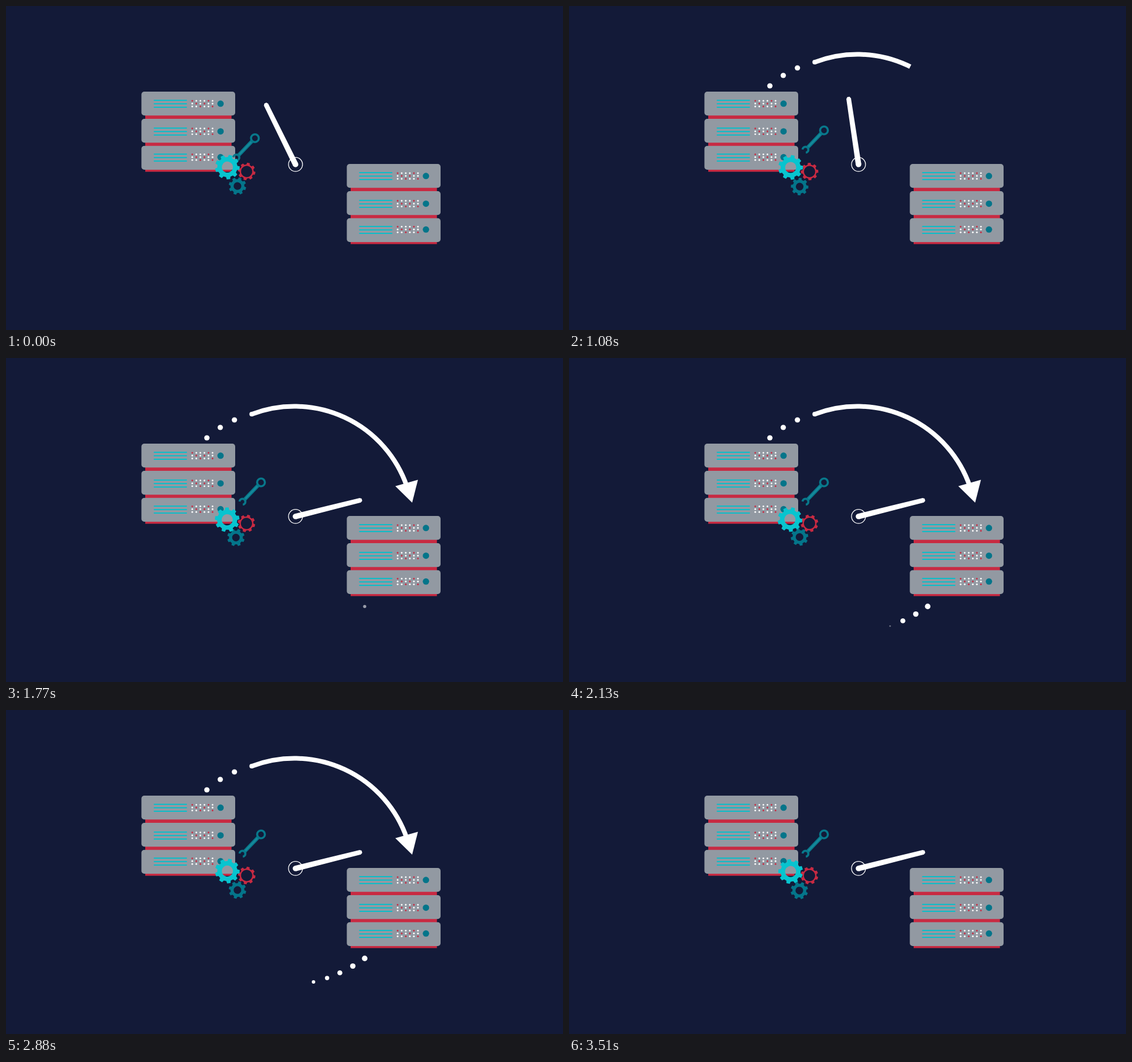
Animation of 960x560 px, one loop 3.54 s. Source, as an HTML page:

```html
<!DOCTYPE html>
<html lang="en">
<head>
<meta charset="utf-8">
<title>Server migration</title>
<style>
  html, body { margin: 0; width: 100%; height: 100%; overflow: hidden; background: #131a38; }
  svg { display: block; width: 960px; height: 560px; }
</style>
</head>
<body>
<svg viewBox="0 0 960 560">
  <defs>
    <g id="server">
      <path fill="#c82a42" d="M240 170H388.7V286.5H240z"/>
      <g id="units"></g>
    </g>
    <mask id="sweep" maskUnits="userSpaceOnUse" x="380" y="50" width="360" height="230">
      <path id="wipe" fill="none" stroke="#fff" stroke-width="64"/>
    </mask>
  </defs>

  <use href="#server"/>
  <use href="#server" x="354" y="125"/>

  <g id="wrench" fill="none" stroke="#08788b">
    <g transform="translate(439.5 215) rotate(133.7)">
      <path d="M7 0H41" stroke-width="6.4"/>
      <path d="M9 0H39" stroke="#178a9b" stroke-width="2.6"/>
      <circle r="6.7" stroke-width="3.6"/>
      <path d="M49.4 3.9A5 5 0 1 1 49.4 -3.9" stroke-width="3.8"/>
    </g>
  </g>
  <g id="gears" fill-rule="evenodd"></g>

  <g id="route" fill="#fff">
    <g id="dots"></g>
    <g mask="url(#sweep)">
      <path id="arc" fill="none" stroke="#fff" stroke-width="8"/>
      <circle cx="423.5" cy="97" r="4"/>
      <path d="M671 221.5L710 210.5L700 250z"/>
    </g>
  </g>

  <g transform="translate(499 273.8)">
    <circle r="12.1" fill="none" stroke="#fff" stroke-width="1.3"/>
    <g id="needle">
      <path d="M-4.8 0L-4 -115L-2 -118H2L4 -115L4.8 0z" fill="#fff"/>
      <circle r="4.8" fill="#fff"/>
    </g>
  </g>
</svg>
<script>
const LOOP = 3540;
const $ = id => document.getElementById(id);
const add = (parent, tag, attrs) => {
  const el = document.createElementNS('http://www.w3.org/2000/svg', tag);
  for (const key in attrs) el.setAttribute(key, attrs[key]);
  return parent.appendChild(el);
};
const ramp = (t, start, length) => Math.min(1, Math.max(0, (t - start) / length));
const smooth = p => (1 - Math.cos(Math.PI * p)) / 2;
const quad = p => p < .5 ? 2 * p * p : 1 - 2 * (1 - p) ** 2;
const cubic = p => p < .5 ? 4 * p ** 3 : 1 - 4 * (1 - p) ** 3;

// Rack units: box top, centre of the lines, centre of the lamps
const lamps = ['rwwwrw', 'wrwrww', 'wwrwwr'];
for (const [top, mid, lamp] of [[148, 169, 168.8], [195, 217, 216.7], [241.7, 262, 261.3]]) {
  const unit = $('units');
  add(unit, 'rect', { x: 233.4, y: top, width: 161.6, height: 41.2, rx: 5, fill: '#9299a2' });
  for (const dy of [-6, 0, 6])
    add(unit, 'rect', { x: 254.5, y: mid + dy - 1, width: 57.5, height: 2, rx: 1, fill: '#0cbdc8' });
  lamps.forEach((row, j) => [...row].forEach((c, i) =>
    add(unit, 'circle', { cx: 321 + i * 7, cy: lamp + (j - 1) * 4.9, r: 1.45, fill: c === 'r' ? '#c82a42' : '#fff' })));
  add(unit, 'circle', { cx: 369.8, cy: lamp, r: 5.5, fill: '#04758a' });
}

// Arc angles are in degrees, clockwise from straight up
const arc = (from, to) => {
  const at = deg => {
    const a = deg * Math.PI / 180;
    return `${497 + 205 * Math.sin(a)} ${288.5 - 205 * Math.cos(a)}`;
  };
  return `M${at(from)}A205 205 0 0 1 ${at(to)}`;
};
$('arc').setAttribute('d', arc(-21, 71));

const cog = (teeth, outer, root, hole) => {
  const step = 2 * Math.PI / teeth, pts = [];
  for (let i = 0; i < teeth; i++)
    for (const [f, r] of [[-.31, root], [-.2, outer], [.2, outer], [.31, root]]) {
      const a = (i + f) * step;
      pts.push(`${(r * Math.cos(a)).toFixed(2)} ${(r * Math.sin(a)).toFixed(2)}`);
    }
  return `M${pts.join('L')}zM${hole} 0A${hole} ${hole} 0 1 0 ${-hole} 0A${hole} ${hole} 0 1 0 ${hole} 0z`;
};
const gears = [
  { x: 414.6, y: 286, color: '#c82a42', d: cog(8, 15.2, 12.2, 9.7), phase: 12, wobble: .2 },
  { x: 397.6, y: 310.8, color: '#04758a', d: cog(8, 15.2, 12, 6.6), phase: 18, wobble: 1.4 },
  { x: 381.4, y: 279, color: '#08c4cf', d: cog(9, 21.4, 17.4, 9.6), phase: -75, wobble: .6 }
];
for (const g of gears) g.el = add($('gears'), 'path', { d: g.d, fill: g.color });

const dots = [
  [346.2, 138, 4.6, 90], [369.3, 120, 4.6, 240], [393.7, 107, 4.6, 390],
  [618.2, 429.4, 4.8, 1680], [597.7, 442.6, 4.7, 1810], [575.4, 454.2, 4.3, 1940, 3203],
  [553.4, 463.3, 3.7, 2070, 3126], [530, 470, 3, 2200, 3030]
].map(([cx, cy, r, show, hide = LOOP]) => ({ r, show, hide, el: add($('dots'), 'circle', { cx, cy }) }));

function draw(t) {
  const lift = 1 - smooth(ramp(t, 0, 1060));
  $('wrench').setAttribute('transform', `translate(${-10.5 * lift} ${13.5 * lift})`);

  const turn = .157 * Math.max(0, t - 600);
  for (const g of gears) {
    const deg = g.phase + turn;
    g.el.setAttribute('transform', `translate(${g.x} ${g.y}) rotate(${deg}) translate(${g.wobble} 0)`);
  }

  for (const d of dots) {
    const size = ramp(t, d.show, 160) * (1 - ramp(t, d.hide, 240));
    d.el.setAttribute('r', d.r * size);
    d.el.setAttribute('opacity', size);
  }

  const sweep = quad(ramp(t, 690, 810));
  $('wipe').setAttribute('d', sweep ? arc(-23, -23 + 106 * sweep) : '');
  $('route').setAttribute('opacity', 1 - ramp(t, 3300, 210));
  $('needle').setAttribute('transform', `rotate(${-26.2 + 102.1 * cubic(ramp(t, 800, 800))})`);
}

function tick() {
  draw(performance.now() % LOOP);
  requestAnimationFrame(tick);
}
tick();
</script>
</body>
</html>
```
